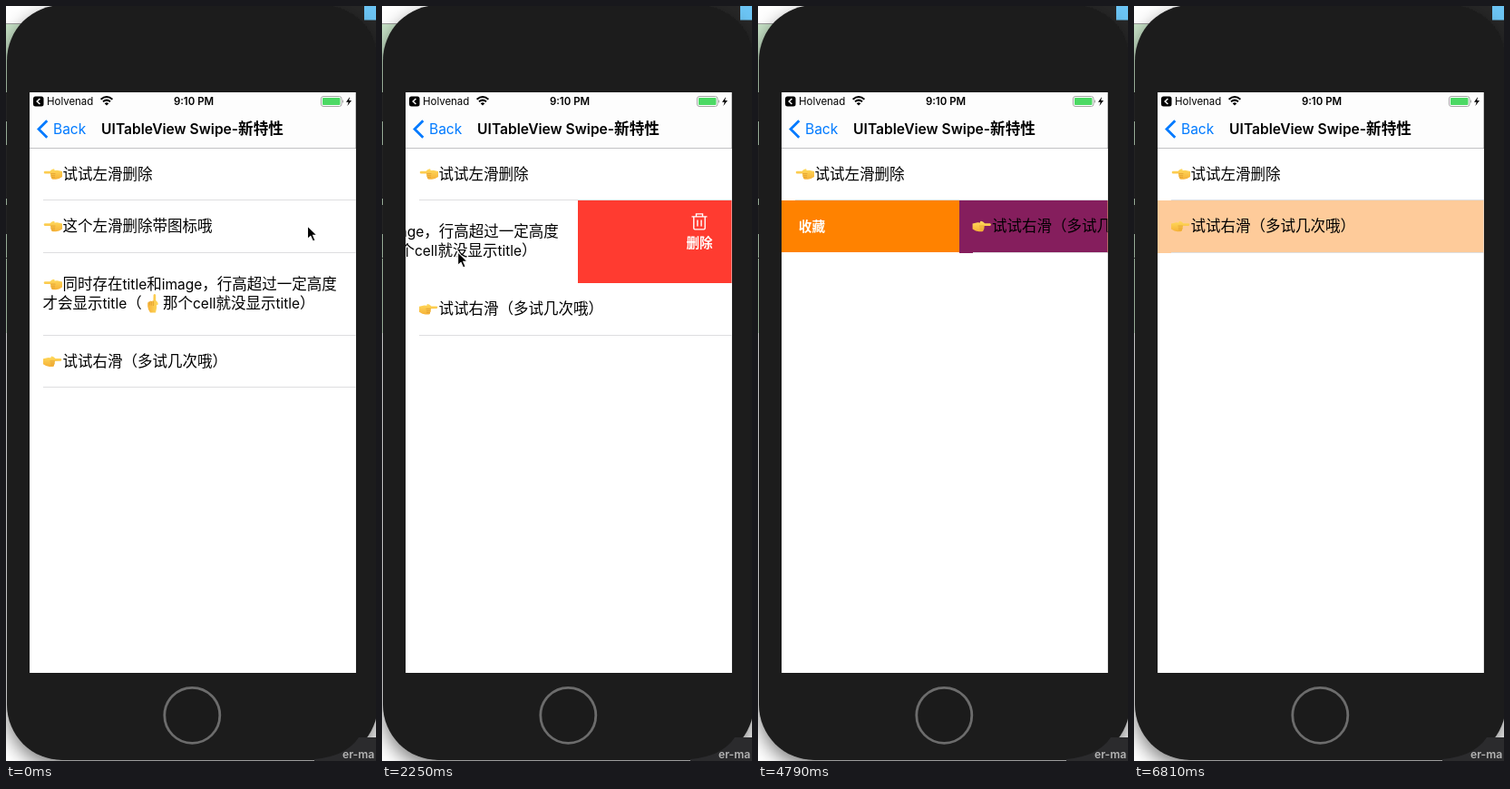
These frames come from a looping animation (408x831 px, 7.63 s). An HTML page:

```html
<!DOCTYPE html>
<html lang="zh-CN">
<head>
<meta charset="utf-8">
<title>Swipe actions</title>
<style>
  html, body { margin: 0; width: 100%; height: 100%; overflow: hidden; background: #fff; }
  svg { display: block; width: 408px; height: 831px; }
  text { font-family: Inter, "Noto Sans CJK SC", "Noto Sans CJK", sans-serif; white-space: pre; }
  .cjk { font-family: "Noto Sans CJK SC", "Noto Sans CJK", sans-serif; }
  #rows rect { shape-rendering: crispEdges; }
</style>
</head>
<body>
<svg viewBox="0 0 408 831">
  <defs>
    <clipPath id="screenClip"><rect x="26" y="95" width="359.5" height="639"/></clipPath>
    <linearGradient id="skin" x1="0" y1="0" x2="0" y2="1">
      <stop offset="0" stop-color="#ffda5c"/><stop offset="1" stop-color="#f6b238"/>
    </linearGradient>
    <filter id="shadow" x="-20%" y="-20%" width="140%" height="140%">
      <feDropShadow dx="0" dy="8" stdDeviation="10" flood-opacity=".5"/>
    </filter>
    <g id="hand">
      <path fill="url(#skin)" d="M-9 -3.2H-3Q-1 -5.8 1 -5.8Q2.6 -5.6 2 -4L5 -4.2L10.5 -3V3Q7 5.6 3.5 5.8H0Q-2 5.4 -1.5 3.7Q-2.9 2.8 -2.1 1.4Q-2.9 .7 -2.3 -.4L-9 -.6Q-10.8 -1.9 -9 -3.2Z"/>
      <path fill="none" stroke="#dd982c" stroke-width=".7" d="M-2.3 -.4H3M-2 1.7H2.6M-1.5 3.7H2.4"/>
    </g>
    <g id="trash" fill="none" stroke="#fff" stroke-width="1.4">
      <path d="M-8.5 -5.5H8.5M-3.5 -5.5V-8.5H3.5V-5.5M-6.2 -5.5V7.2Q-6.2 8.5 -4.9 8.5H4.9Q6.2 8.5 6.2 7.2V-5.5M-2.1 -2V5M2.1 -2V5"/>
    </g>
  </defs>

  <!-- desktop -->
  <rect width="408" height="831" fill="#fff"/>
  <rect y="20" width="60" height="340" fill="#c5e0c5"/>
  <rect y="19" width="60" height="1" fill="#999"/>
  <rect x="340" width="68" height="80" fill="#272727"/>
  <rect x="395" width="13" height="15.5" fill="#6cc5f5"/>

  <!-- phone -->
  <rect x="1" y="-1" width="409" height="831" rx="61" fill="#1c1c1c" filter="url(#shadow)"/>
  <path d="M.5 95V278" stroke="#242424" stroke-dasharray="32 26 59 7"/>
  <path d="M340 831V829Q375 826 389 805H408V831Z" fill="#2b2b2d"/>
  <g id="desk"></g>
  <circle cx="205.3" cy="780.8" r="30.5" fill="#1b1b1b" stroke="#6c6c6c" stroke-width="2.8"/>

  <g clip-path="url(#screenClip)">
    <rect x="26" y="95" width="360" height="639" fill="#fff"/>
    <g id="rows"></g>
    <rect x="26" y="95" width="360" height="61" fill="#fdfdfd"/>
    <rect x="26" y="156" width="360" height="1" fill="#c2c2c4"/>
    <g id="bar">
      <rect x="30" y="99.5" width="11.5" height="11" rx="2.5"/>
      <path d="M37.4 102L34.2 105L37.4 108" fill="none" stroke="#fff" stroke-width="1.5"/>
      <path d="M104.6 102.7Q111 97.3 117.4 102.7M107 105.3Q111 101.9 115 105.3" fill="none" stroke="#000" stroke-width="2"/>
      <path d="M111 109.6L108.7 107.2Q111 105.3 113.3 107.2Z"/>
      <rect x="347.5" y="99.5" width="22.5" height="11" rx="2.5" fill="#fff" stroke="#a5a5a5"/>
      <rect x="349" y="101" width="19.5" height="8" rx="1" fill="#4cd964"/>
      <path d="M371 103Q373 105 371 107Z" fill="#999"/>
      <path d="M379.2 100L375 105.7H377.7L376.4 110L381 104H378.2Z"/>
      <path d="M45.3 126.2L36 135.5L45.3 144.8" fill="none" stroke="#007aff" stroke-width="2.8"/>
    </g>
  </g>
  <path id="cursor" d="M0 0V14.5L3.4 11.4L5.9 17L8.5 15.9L6.1 10.4H10.6Z" stroke="#fff" stroke-width="1.1"/>
</svg>

<script>
const LOOP = 7630;
const WIDTH = 360;
const DRAG = 170;
const $ = id => document.getElementById(id);

function add(parent, tag, attrs = {}) {
  const node = document.createElementNS("http://www.w3.org/2000/svg", tag);
  for (const key in attrs) node.setAttribute(key, attrs[key]);
  parent.appendChild(node);
  return node;
}

// Latin runs are set slightly smaller than the Chinese runs beside them.
function write(parent, text, x, y, size = 16.5, attrs = {}) {
  const node = add(parent, "text", { x, y, ...attrs });
  for (const run of text.split(/([\u3000-\u9fff\uff00-\uffef]+)/)) {
    if (!run) continue;
    const cjk = run.charCodeAt(0) >= 0x3000;
    const span = add(node, "tspan", { "font-size": cjk ? size : size * 0.94 });
    if (cjk) span.setAttribute("class", "cjk");
    span.textContent = run;
  }
}

const hand = (parent, x, y, turn = "") =>
  add(parent, "use", { href: "#hand", transform: `translate(${x} ${y}) ${turn}` });

const move = (node, x, y) => node.setAttribute("transform", `translate(${x} ${y})`);

const ramp = (t, from, to) => Math.min(1, Math.max(0, (t - from) / (to - from)));

function ease(t, from, to) {
  const k = ramp(t, from, to);
  return k * k * (3 - 2 * k);
}

// Fixed texts
const strong = { "font-weight": 600, "text-anchor": "middle" };
write($("desk"), "er-ma", 371, 828, 13, { fill: "#b4b4b4", "font-weight": 600 });
write($("bar"), "Holvenad", 45, 109, 12.2);
write($("bar"), "9:10 PM", 207, 109, 12.2, strong);
write($("bar"), "Back", 52, 141, 16.5, { fill: "#007aff" });
write($("bar"), "UITableView Swipe-新特性", 205.5, 141, 16.6, strong);

// Each row backs onto tall white, so it covers a collapsing row above it.
function makeRow(top, height, color) {
  const root = add($("rows"), "g");
  add(root, "rect", { x: 26, width: WIDTH, height: 700, fill: "#fff" });
  const back = add(root, "g");
  add(back, "rect", { x: 26, width: WIDTH, height: height - 0.6, fill: color });
  const action = add(back, "g", { fill: "#fff", ...strong });
  const cell = add(root, "g");
  const face = add(cell, "rect", { x: 26, width: WIDTH, height, fill: "#fff" });
  add(cell, "rect", { x: 41, y: height - 1, width: WIDTH, height: 1, fill: "#dedee0" });
  move(root, 0, top);
  return { root, top, height, back, action, cell, face };
}

const RED = "#ff3b30";
const plainRow = makeRow(157, 57, "#fff");
hand(plainRow.cell, 51.5, 28);
write(plainRow.cell, "试试左滑删除", 62.5, 33.6);

const iconRow = makeRow(214, 57.6, RED);
hand(iconRow.cell, 51.5, 28.5);
write(iconRow.cell, "这个左滑删除带图标哦", 62.5, 34);
add(iconRow.action, "use", { href: "#trash", y: 28.5 });

const titleRow = makeRow(272, 91.2, RED);
hand(titleRow.cell, 51.5, 34.5);
write(titleRow.cell, "同时存在title和image，行高超过一定高度", 62.5, 40);
write(titleRow.cell, "才会显示title（", 40.5, 61);
hand(titleRow.cell, 162, 55, "rotate(90)");
write(titleRow.cell, "那个cell就没显示title）", 173, 61);
add(titleRow.action, "use", { href: "#trash", y: 23 });
write(titleRow.action, "删除", 0, 52, 14.6);

const starRow = makeRow(362.8, 57.6, "#ff8200");
hand(starRow.cell, 51.5, 28.5, "scale(-1 1)");
write(starRow.cell, "试试右滑（多试几次哦）", 62.5, 34);
write(starRow.action, "收藏", 0, 33.8, 14.6);

// A swipe is dragged, snaps fully open, then closes again or its row collapses.
const iconSwipe = { start: 350, snap: 740, collapse: 870, end: 1195 };
const titleSwipe = { start: 1900, snap: 2250, collapse: 2510, end: 2800 };
const starSwipes = [
  { start: 3560, snap: 4300, close: 4579, color: "#851e5d" },
  { start: 5200, snap: 5480, close: 5663, color: "#fecb9a" }
];

const offset = (t, { start, snap, close = Infinity }) =>
  DRAG * ramp(t, start, snap) + (WIDTH - DRAG) * ease(t, snap, snap + 150)
  - (t > close ? WIDTH * ease(t, close, close + 450) : 0);

function slide(row, x, labelX) {
  move(row.cell, x, 0);
  move(row.action, labelX, 0);
  row.back.setAttribute("visibility", Math.abs(x) > 0.1 ? "visible" : "hidden");
}

// Returns the height lost by the row.
function swipeLeft(row, swipe, t) {
  const x = offset(t, swipe);
  slide(row, -x, 422 - Math.min(x, 72) - 288 * ramp(x, 215, WIDTH));
  row.root.setAttribute("visibility", t < swipe.end ? "visible" : "hidden");
  if (t >= swipe.end) row.back.setAttribute("visibility", "hidden");
  return row.height * ease(t, swipe.collapse, swipe.end);
}

function swipeRight(row, t) {
  const swipe = t < starSwipes[1].start ? starSwipes[0] : starSwipes[1];
  const x = offset(t, swipe);
  slide(row, x, -7.5 + (t < swipe.snap ? Math.min(x, 67) : 0.342 * x));
  const done = starSwipes.filter(s => t >= s.close).pop();
  row.face.setAttribute("fill", done ? done.color : "#fff");
}

// Pointer stops: time, x, y
const stops = [
  [350, 332.5, 242], [820, 110, 228], [1170, 203, 225], [1600, 340, 322], [1900, 325, 280],
  [2250, 84, 271], [2450, 13, 264], [3020, 104, 256], [3560, 70, 254], [4380, 420, 256],
  [4850, 420, 270], [5200, 100, 258], [5700, 420, 258], [6300, 420, 300], [6600, 330, 845]
];

function pointer(t) {
  const next = stops.findIndex(([time]) => t < time);
  if (next < 1) return stops.at(next).slice(1);
  const [from, x0, y0] = stops[next - 1];
  const [to, x1, y1] = stops[next];
  const k = ramp(t, from, to);
  return [x0 + (x1 - x0) * k, y0 + (y1 - y0) * k];
}

function draw(t) {
  const iconLoss = swipeLeft(iconRow, iconSwipe, t);
  const titleLoss = swipeLeft(titleRow, titleSwipe, t);
  swipeRight(starRow, t);
  move(titleRow.root, 0, titleRow.top - iconLoss);
  move(starRow.root, 0, starRow.top - iconLoss - titleLoss);
  move($("cursor"), ...pointer(t));
}

const start = performance.now();
function tick() {
  draw((performance.now() - start) % LOOP);
  requestAnimationFrame(tick);
}
tick();
</script>
</body>
</html>
```
